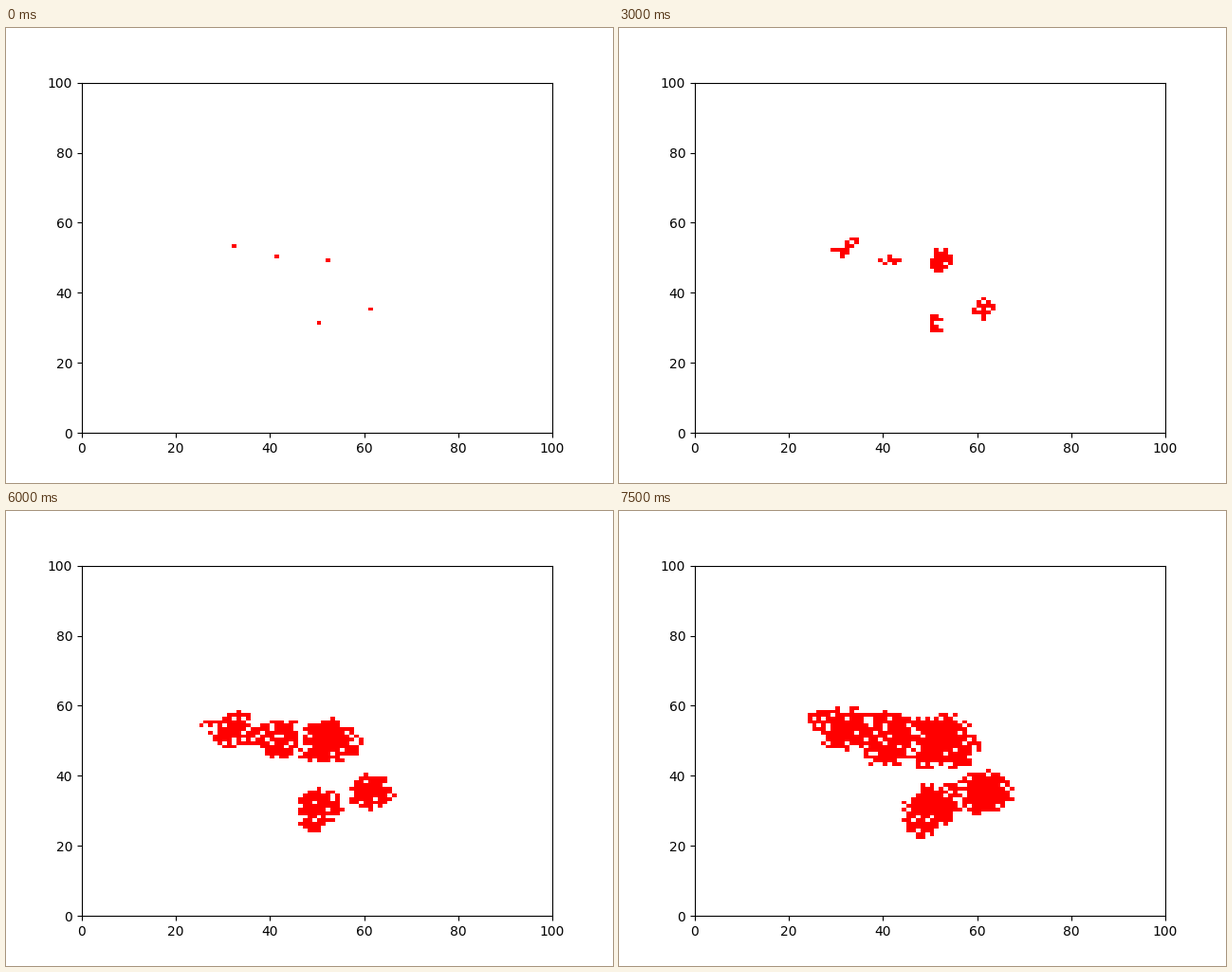
A matplotlib script for the animation above (8 s loop, 640 by 480 pixels).

```python
import numpy as np
import matplotlib.pyplot as plt
from matplotlib.animation import FuncAnimation
from matplotlib.colors import ListedColormap

SIZE = 100
STEPS = 16
DELAY = 3.5  # mean wait of a cell once the front has reached it

# Colonies: x, y, first step, pace
SEEDS = [(32, 53, 0, 0.75), (41, 50, 0, 0.85), (52, 49, 0, 1),
         (50, 31, 0, 0.7), (61, 35, 0, 0.72)]
OFFSHOOTS = [(27, 56, 6, 0.7), (40, 55, 5, 0.7), (38, 46, 8, 0.7),
             (48, 26, 5, 0.7), (55, 36, 9, 0.7)]


def birth_steps(rng):
    """Step from which each cell may turn red."""
    y, x = np.mgrid[:SIZE, :SIZE]
    fronts = [start + 0.85 * (np.hypot(x - cx, y - cy) / pace) ** 1.3
              for cx, cy, start, pace in SEEDS + OFFSHOOTS]
    return np.min(fronts, axis=0) + rng.exponential(DELAY, (SIZE, SIZE))


def near(cells):
    """Cells that touch a red cell, corners included."""
    p = np.pad(cells, 1)
    return np.any([p[i:i + SIZE, j:j + SIZE]
                   for i in range(3) for j in range(3)], axis=0)


def grow():
    birth = birth_steps(np.random.default_rng(5))
    cells = np.zeros((SIZE, SIZE), bool)
    for x, y, *_ in SEEDS:
        cells[y, x] = True
    states = [cells]
    for step in range(1, STEPS):
        cells = cells | (near(cells) & (birth <= step))
        states.append(cells)
    return states


def edges(start, length):
    """Cell borders in data units, set on whole pixels."""
    pixel = np.floor(start + length * np.arange(SIZE + 1) / SIZE + 1e-6)
    return (pixel + 0.25 - start) * SIZE / length


states = grow()

fig, ax = plt.subplots(figsize=(6.4, 4.8), dpi=100)
box = ax.bbox
mesh = ax.pcolormesh(edges(box.x0, box.width), edges(box.y0, box.height),
                     states[0].astype(float), vmin=0, vmax=1,
                     cmap=ListedColormap(["white", "red"]))
ax.set(xlim=(0, SIZE), ylim=(0, SIZE))


def update(step):
    mesh.set_array(states[step].astype(float))
    return [mesh]


anim = FuncAnimation(fig, update, frames=STEPS, interval=500,
                     repeat=True, repeat_delay=0)
plt.show()
```
